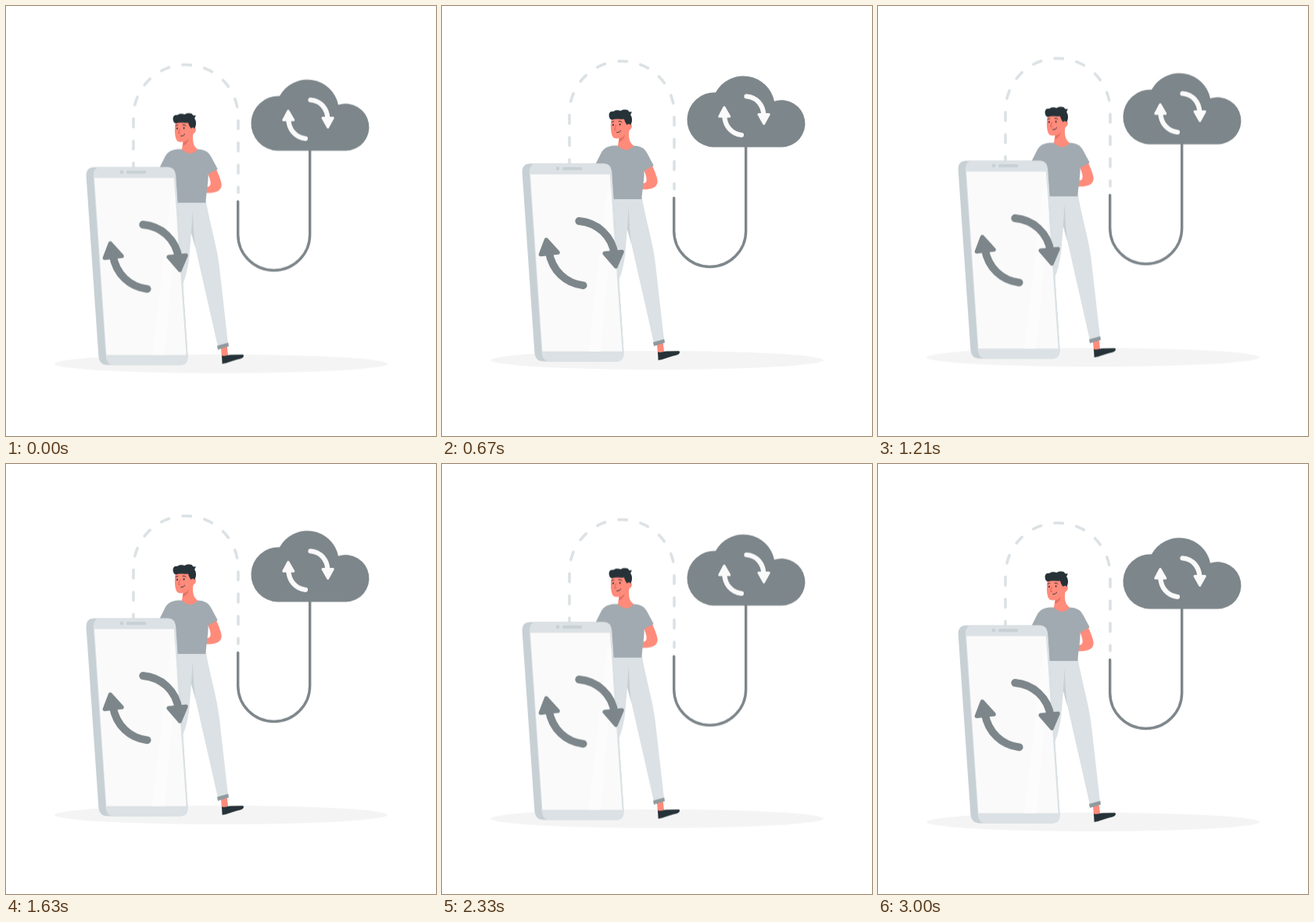
Animation of 550x550 px, one loop 3040 ms. Source, as an HTML page:

```html
<!DOCTYPE html>
<html lang="en">
<head>
<meta charset="utf-8">
<title>Cloud sync</title>
<style>
  html, body { margin: 0; width: 100%; height: 100%; overflow: hidden; background: #fff; }
  svg { display: block; width: 100vw; height: 100vh; }
  .slate { fill: #7d868a; stroke: #7d868a; }
  .white { fill: #fafafa; stroke: #fafafa; }
  .pale { fill: #dbe1e4; }
  .mid { fill: #c7d0d4; }
  .skin { fill: #ff8b7b; }
  .dark { fill: #263238; }
  .line { fill: none; stroke-linecap: round; }
  .head { stroke-linejoin: round; }
</style>
</head>
<body>
<svg viewBox="0 0 550 550">
  <g id="scene">
    <ellipse cx="275" cy="458" rx="213" ry="12" fill="#f4f4f4"/>

    <!-- connection -->
    <path class="line" d="M163 206V142.5A67 67 0 0 1 297 142.5V239" stroke="#dbe1e4" stroke-width="3.6"
      stroke-dasharray="10.6 17.8" stroke-dashoffset="-22.45"/>
    <path class="line" d="M296.7 250.5V292.5A46 46 0 0 0 388.7 292.5V184" stroke="#7d868a" stroke-width="3.4"/>

    <!-- cloud -->
    <path fill="#7d868a" d="M347 185.5A35 35 0 0 1 350 115.5A40.4 40.4 0 0 1 425 126.8A30.1 30.1 0 1 1 434.8 185.5Z"/>
    <g class="white">
      <path class="line" stroke-width="6.2" d="M389.5 120.5C402 121.5 411 131 411.5 145"/>
      <path class="head" stroke-width="3" d="M405 143.5H418.3L411.7 155.5Z"/>
      <path class="line" stroke-width="6.2" d="M383 170C370 168.5 361.5 158 361.3 145"/>
      <path class="head" stroke-width="3" d="M354.8 146.3H367.8L361 134.5Z"/>
    </g>

    <!-- legs -->
    <path class="pale" d="M216 251H241L237 290L234 325C231 345 228 352 224 360Z"/>
    <path class="pale" d="M236 251H256C261 280 270 308 273 335L284 432L271 436C262 395 245 322 238 290Z"/>
    <path class="mid" d="M238.8 262L236.8 290L242.5 311C240 294 239.5 280 238.8 262Z"/>
    <path class="skin" d="M275 438L282.8 436L284 447L276 450Z"/>
    <path fill="#8f9a9f" d="M270 435L284.3 431L285 435.8L271 440Z"/>
    <path class="dark" d="M276 447.5C280 449 284 446 289 446.5L303 446.2C305.3 447.5 303.5 450.5 300 451.5C293 453 287 455.5 281 457.2L276.6 458Z"/>

    <!-- arm and shirt -->
    <path class="skin" d="M268 207C273 218 276 226 275.7 230C275 236 270 238.6 262 239.4C252 240 243 237.3 237 236.2C232 236.6 228 235 227.3 231.5C229 227.8 234 227.3 237 228.5L240 231L259 231.6C263.5 230 262 222 257 213Z"/>
    <path fill="#a0aab0" d="M225 183.5C214 183 208 185.5 204 192L196 208L216 226L218 252H255.5C256 240 259 226 258.6 215.5L270.8 209L262.5 193.5C259 187 255 184 244 183.5Z"/>

    <!-- head -->
    <path class="skin" d="M227 169L225 183.5C229 188 234 189.3 236.5 189C240 188.3 243.5 186 245 183.5C240 180 238 174 239.5 163Z"/>
    <path fill="#e8705f" d="M227 174.2C230 173.8 232.5 172 234 169.5C233 174.5 230.5 177.5 226.6 179Z"/>
    <path class="skin" d="M217 148C215 158 215.8 169 219 173C223 176 230 174 233.5 169.5C236 166.5 238 165 240 163.5C243 162 244 157.5 241.5 155.5L238 147Z"/>
    <path class="dark" d="M215 149.5C212 144 214 139 219 140C222 137 226 138.5 229 139C231 137 236 137.5 238 138.3C238.5 140 240 141 242.7 140C242.5 142 241.5 143 241 144C244 148 243.5 154 241 157.3C239 154.5 238 156.5 236.5 157C235 154.5 233.5 152.5 233 149.5C227 150.5 222 148.5 217.5 150.5Z"/>
    <ellipse class="dark" cx="218.9" cy="157" rx=".9" ry="1.3"/>
    <ellipse class="dark" cx="227.6" cy="156.5" rx=".9" ry="1.3"/>
    <g class="line" stroke="#263238" stroke-width=".9">
      <path d="M217.2 153.4L219.8 152.6M226 152.3Q228.3 151.6 230 153.4"/>
      <path d="M223.7 166.7Q227 167.2 228.8 164.3"/>
      <path stroke="#d95f50" d="M222.5 157.5L220.5 163L222.8 163.2"/>
    </g>

    <!-- phone -->
    <path class="mid" d="M113 206.5H208Q216 206.5 217 217L232.5 448Q232.5 459.5 223 459.5H130Q119.5 459.5 118.4 448L102.6 218Q102.2 206.5 113 206.5Z"/>
    <path class="pale" d="M121 206.5H207Q216.3 206.5 217.2 217L232.6 448Q232.8 459.5 223 459.5H138Q128.5 459.5 127.6 448L111.8 218Q111.5 206.5 121 206.5Z"/>
    <path fill="#fafafa" d="M113 220.3H214.8L230.6 446.8H128.4Z"/>
    <path fill="#fcfcfc" d="M211 240L216 237L218.5 273L203 446.8H187Z"/>
    <circle class="mid" cx="148" cy="212.8" r="2.2"/>
    <rect class="mid" x="154" y="211" width="25.3" height="3.8" rx="1.9"/>

    <!-- sync arrows -->
    <g class="slate">
      <path class="line" stroke-width="9.8" d="M175.2 280C198 282 217.5 298 221 324"/>
      <path class="head" stroke-width="5" d="M207.8 321.3L230.3 319.3L222.3 338.2Z"/>
      <path class="line" stroke-width="9.8" d="M180.7 362.3C159 360 140.5 344 136.5 318"/>
      <path class="head" stroke-width="5" d="M126.2 322.7L148.3 320.3L133.3 303.8Z"/>
    </g>
  </g>
</svg>
<script>
  const PERIOD = 3040, LEAD = 60, RISE = 10.3;
  const scene = document.getElementById("scene");
  const shift = y => ({ transform: `translate(0px, ${y}px)` });
  scene.animate([shift(0), shift(-RISE), shift(0)], {
    duration: PERIOD, delay: -LEAD, iterations: Infinity, easing: "linear"
  });
</script>
</body>
</html>
```
